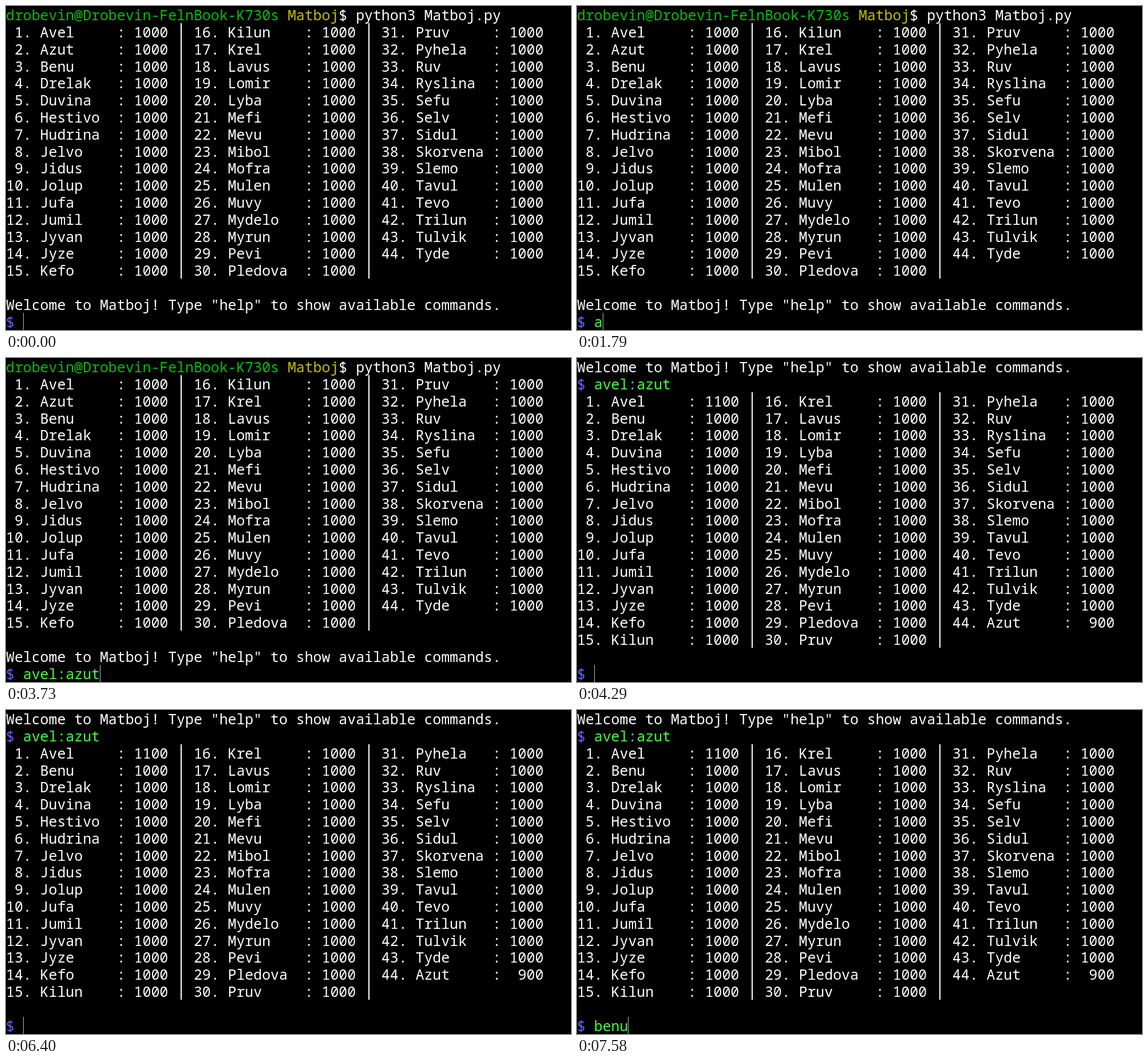
These frames come from a looping animation (987x567 px, 8000 ms). An HTML page:

```html
<!DOCTYPE html>
<html lang="en">
<head>
<meta charset="utf-8">
<title>Terminal</title>
<style>
  html, body { margin: 0; width: 100%; height: 100%; overflow: hidden; background: #000; }
  #term {
    position: relative; width: 987px; height: 567px; overflow: hidden;
    color: #fff; font: 500 24.858px/29.84px "Noto Sans Mono", monospace;
    font-variant-ligatures: none;
  }
  .row { position: absolute; left: 0; height: 29.84px; white-space: pre; }
  .host { color: #00bf00; }
  .dir { color: #bfbf00; }
  .prompt { color: #6060ff; }
  .input { color: #40ff40; }
  .bar { color: transparent; background: linear-gradient(#fff, #fff) center / 2px 30px no-repeat; }
  #cursor { position: absolute; top: 537px; width: 1px; height: 30px; background: #bfbfbf; }
</style>
</head>
<body>
<div id="term"><div id="screen"></div><div id="cursor"></div></div>
<script>
const LOOP = 8000, CELL = 14.915, LINE = 29.8, TOP = 1.2, ROWS = 15;
const names = `Avel Azut Benu Drelak Duvina Hestivo Hudrina Jelvo Jidus Jolup Jufa
  Jumil Jyvan Jyze Kefo Kilun Krel Lavus Lomir Lyba Mefi Mevu Mibol Mofra Mulen Muvy
  Mydelo Myrun Pevi Pledova Pruv Pyhela Ruv Ryslina Sefu Selv Sidul Skorvena Slemo
  Tavul Tevo Trilun Tulvik Tyde`.split(/\s+/);

const span = (cls, text) => `<span class="${cls}">${text}</span>`;
const prompt = text => span("prompt", "$") + " " + span("input", text);

function table(players) {
  const cells = players.map(([name, score], i) =>
    `${String(i + 1).padStart(2)}. ${name.padEnd(9)}: ${String(score).padStart(4)}`);
  return Array.from({ length: ROWS }, (_, r) =>
    [0, 1, 2].map(c => cells[c * ROWS + r] || "").join(` ${span("bar", "|")} `));
}

const start = names.map(name => [name, 1000]);
const [winner, loser, ...rest] = names;
const result = [[winner, 1100], ...rest.map(name => [name, 1000]), [loser, 900]];
const welcome = 'Welcome to Matboj! Type "help" to show available commands.';
const screens = [
  [span("host", "drobevin@Drobevin-FelnBook-K730s") + " " + span("dir", "Matboj") +
    "$ python3 Matboj.py", ...table(start), "", welcome],
  [welcome, prompt("avel:azut"), ...table(result), ""]
];

// [time, screen, typed text, cursor visible]
const steps = [
  [0, 0, "", 1], [400, 0, "", 0], [990, 0, "", 1], [1390, 0, "", 0],
  [1790, 0, "a", 1], [2070, 0, "av", 1], [2220, 0, "avel", 1], [2780, 0, "avel", 0],
  [3050, 0, "avel:", 1], [3460, 0, "avel:a", 1], [3610, 0, "avel:azu", 1],
  [3730, 0, "avel:azut", 1],
  [4290, 1, "", 1], [4880, 1, "", 0], [5410, 1, "", 1], [5970, 1, "", 0],
  [6400, 1, "", 1], [6960, 1, "", 0],
  [7270, 1, "b", 1], [7430, 1, "be", 1], [7580, 1, "benu", 1]
];

const screen = document.getElementById("screen");
const cursor = document.getElementById("cursor");
let shown;

function draw(step) {
  const [, page, text, on] = step;
  screen.innerHTML = [...screens[page], prompt(text)].map((line, i) =>
    `<div class="row" style="top:${(i * LINE + TOP).toFixed(2)}px">${line}</div>`).join("");
  cursor.style.left = Math.round((2 + text.length) * CELL) + "px";
  cursor.style.visibility = on ? "visible" : "hidden";
}

function tick() {
  const t = performance.now() % LOOP;
  const step = steps.findLast(s => s[0] <= t);
  if (step !== shown) draw(shown = step);
  requestAnimationFrame(tick);
}
tick();
</script>
</body>
</html>
```
